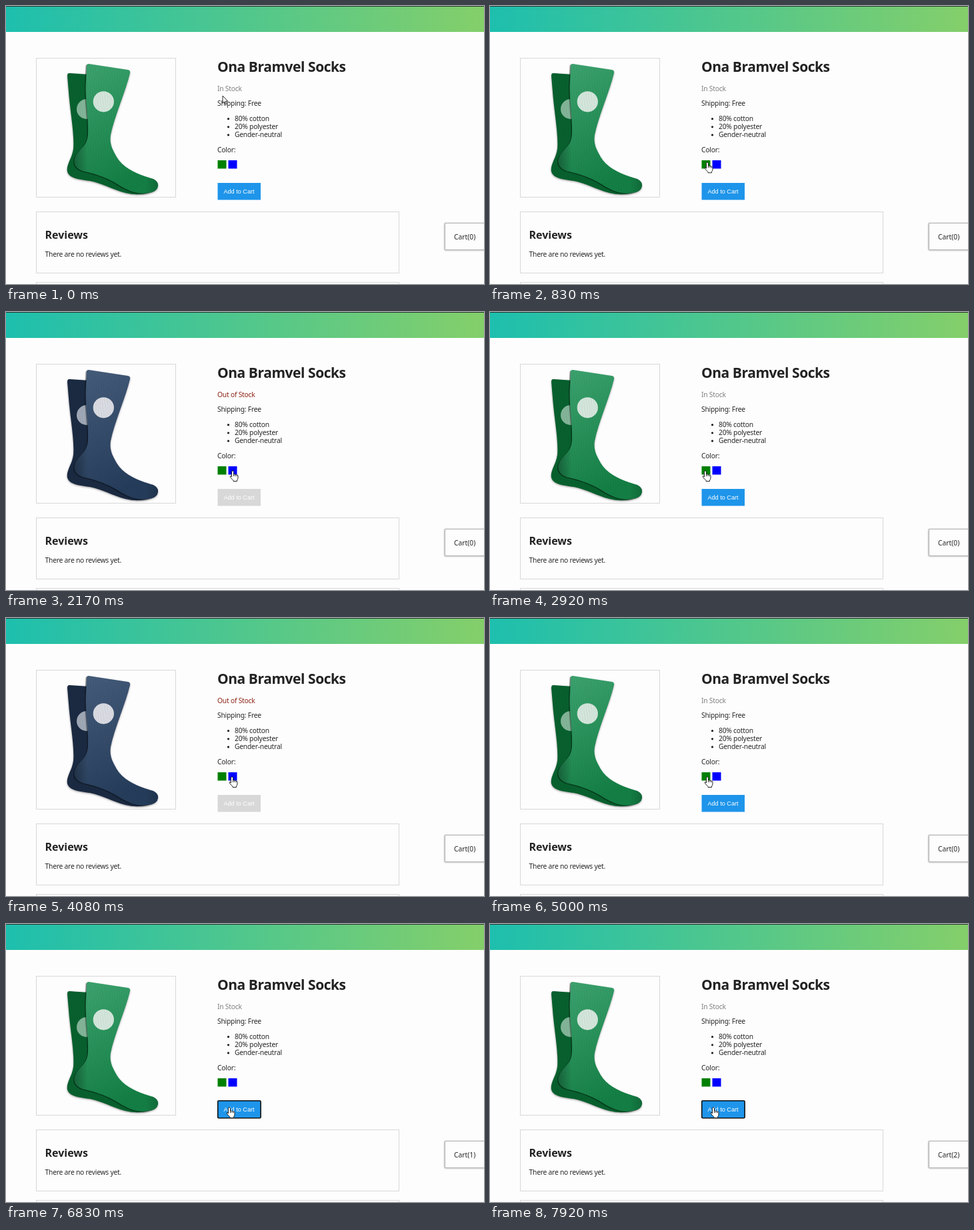
Recreate the animation shown at these times as an HTML page. Size 717x418 px, loop 8000 ms.

```html
<!DOCTYPE html>
<html lang="en">
<head>
<meta charset="utf-8">
<title>Product page</title>
<style>
  html, body { margin: 0; width: 100%; height: 100%; overflow: hidden; background: #fefdfe; }
  svg { display: block; width: 100%; height: 100%; }
  text { font: 10.3px "Noto Sans", "Open Sans", sans-serif; letter-spacing: -.23px; fill: #282828; }
  .title { font-size: 21px; font-weight: 700; letter-spacing: -.45px; fill: #222; }
  .heading { font-size: 16px; font-weight: 700; letter-spacing: 0; fill: #222; }
  .label { font: 9.1px "Liberation Sans", Arial, sans-serif; letter-spacing: 0; fill: #fff; }
  .cart { letter-spacing: 0; }
  .box { fill: none; stroke: #d8d8d8; }
  .cursor { fill: #fff; stroke: #111; stroke-width: .9; stroke-linejoin: round; }
</style>
</head>
<body>
<svg viewBox="0 0 717 418">
  <defs>
    <linearGradient id="nav">
      <stop stop-color="#1dbfae"/><stop offset="1" stop-color="#84cf6a"/>
    </linearGradient>
    <linearGradient id="knit" x1="0" y1="0" x2=".35" y2="1">
      <stop id="knitTop"/><stop id="knitEnd" offset="1"/>
    </linearGradient>
    <linearGradient id="side">
      <stop stop-color="#000" stop-opacity=".3"/>
      <stop offset=".16" stop-color="#000" stop-opacity="0"/>
      <stop offset=".85" stop-color="#000" stop-opacity="0"/>
      <stop offset="1" stop-color="#000" stop-opacity=".16"/>
    </linearGradient>
    <pattern id="ribs" width="2.6" height="4" patternUnits="userSpaceOnUse" patternTransform="rotate(4)">
      <path d="M.5 0V4" stroke="#000" stroke-opacity=".13" stroke-width=".8"/>
    </pattern>
    <path id="front" d="M124 87L183 96Q187 97 186 101C179 130 163 165 157 194C155 208 160 216 166 227C177 246 203 255 221 260Q229 264 228 271Q227 279 214 281C198 284 183 278 169 269C154 259 136 253 119 249C104 246 98 235 106 223C113 213 122 209 123 193C124 165 118 140 120 112L121 90Q121 87 124 87Z"/>
    <path id="back" d="M95 101L125 103 140 225 150 255 215 280Q199 286 179 281C160 276 143 266 126 263C112 261 95 260 92 249C90 239 99 229 101 215C103 194 96 157 94 129L92 105Q92 101 95 101Z"/>
    <clipPath id="backClip"><use href="#back"/></clipPath>
    <filter id="soft" x="-20%" y="-20%" width="140%" height="140%"><feGaussianBlur stdDeviation="1.6"/></filter>
  </defs>

  <rect width="717" height="418" fill="#fefdfe"/>
  <rect width="717" height="39" fill="url(#nav)"/>
  <rect width="717" height="1" fill="#26332f"/>

  <rect class="box" x="45.5" y="78.5" width="209" height="209"/>
  <use href="#back" y="1" fill="#000" opacity=".4" filter="url(#soft)"/>
  <use href="#front" y="1.5" fill="#000" opacity=".3" filter="url(#soft)"/>
  <use id="backFill" href="#back"/>
  <circle id="backBadge" cx="121" cy="155" r="15" clip-path="url(#backClip)"/>
  <use href="#back" fill="url(#ribs)"/>
  <use href="#front" x="-1.5" y="1" fill="#000" opacity=".4"/>
  <use href="#front" fill="url(#knit)"/>
  <use href="#front" fill="url(#side)"/>
  <circle id="badge" cx="146.3" cy="143.8" r="15.6"/>
  <use href="#front" fill="url(#ribs)"/>

  <text class="title" x="317" y="99">Ona Bramvel Socks</text>
  <text id="stock" x="317" y="128"></text>
  <text x="317" y="150.3">Shipping: Free</text>
  <g id="details"></g>
  <text x="317" y="219.5">Color:</text>
  <rect x="317.5" y="232" width="13" height="12.5" fill="#008000"/>
  <rect x="333.5" y="232" width="13" height="12.5" fill="#00f"/>

  <rect id="button" x="317.5" y="266" width="64.5" height="25.5"/>
  <rect id="ring" x="317.7" y="265.7" width="64.4" height="26" rx="1.5" fill="none" stroke="#101010" stroke-width="1.6"/>
  <text class="label" x="326.5" y="281.8">Add to Cart</text>

  <rect class="box" x="45.5" y="309.5" width="544" height="92"/>
  <text class="heading" x="58.5" y="350">Reviews</text>
  <text x="58.5" y="376.6">There are no reviews yet.</text>
  <rect class="box" x="45.5" y="415.5" width="544" height="60"/>

  <rect x="658" y="327" width="80" height="40" fill="#000" opacity=".45" filter="url(#soft)"/>
  <rect x="658.5" y="326.5" width="80" height="40" fill="#fefdfe" stroke="#b4b4b4"/>
  <text class="cart" id="cart" x="672" y="351"></text>

  <path class="cursor" id="arrow" d="M0 0V11.2L2.6 8.8 4.4 12.8 6 12 4.3 8.2H7.8Z"/>
  <path class="cursor" id="hand" d="M-1.5 9V1.3a1.5 1.5 0 0 1 3 0V5.5a1.3 1.3 0 0 1 2.4 .4a1.3 1.3 0 0 1 2.3 .5a1.1 1.1 0 0 1 1.8 .9V10q0 2.5-1.5 4V15.5H1V14.3Q-1 12.5-3.6 9.2Q-4.3 7.6-2.9 7.4Q-2 7.6-1.5 9ZM1.5 5.5V8M3.9 6V8M6.2 6.5V8.2"/>
</svg>
<script>
const LOOP = 8000, STEP = 1000 / 12;
const $ = id => document.getElementById(id);

const GREEN = { top: '#3fa873', end: '#148246', back: '#08632f', badge: '#d9ece1', backBadge: '#86b99c' };
const BLUE = { top: '#48607f', end: '#263e5d', back: '#1b2b43', badge: '#dfe1e8', backBadge: '#a3acba' };

// Cursor stops: time, x, y
const PATH = [
  [0, 325, 135], [170, 325, 138], [920, 326, 239], [1170, 326, 239],
  [1500, 335, 238], [1750, 340, 239], [2500, 340, 239], [2920, 323, 239],
  [3330, 323, 239], [3830, 339, 239], [4330, 339, 239], [4830, 326, 239],
  [5330, 326, 239], [6080, 335, 276], [LOOP, 335, 276]
];

['80% cotton', '20% polyester', 'Gender-neutral'].forEach((line, i) => {
  const y = 173 + i * 12.1;
  $('details').innerHTML += `<circle cx="333.5" cy="${y - 3.3}" r="1.6" fill="#222"/><text x="343" y="${y}">${line}</text>`;
});

const set = (id, attrs) => {
  for (const key in attrs) $(id).setAttribute(key, attrs[key]);
};
const within = (t, from, to) => t >= from && t < to;
const ease = u => u * u * (3 - 2 * u);

function cursorAt(t) {
  const i = PATH.findIndex((p, n) => n && t <= p[0]);
  const [t0, x0, y0] = PATH[i - 1], [t1, x1, y1] = PATH[i];
  const u = ease((t - t0) / (t1 - t0));
  return [x0 + (x1 - x0) * u, y0 + (y1 - y0) * u];
}

function overTarget(x, y) {
  const onSwatch = within(y, 232, 245) && (within(x, 317, 331) || within(x, 333, 347));
  return onSwatch || (within(x, 317, 382) && within(y, 266, 292));
}

function draw(t) {
  const soldOut = within(t, 1490, 2700) || within(t, 3640, 4590);
  const sock = soldOut && t > 1540 ? BLUE : GREEN;
  set('knitTop', { 'stop-color': sock.top });
  set('knitEnd', { 'stop-color': sock.end });
  set('backFill', { fill: sock.back });
  set('badge', { fill: sock.badge });
  set('backBadge', { fill: sock.backBadge });

  $('stock').textContent = soldOut ? 'Out of Stock' : 'In Stock';
  $('stock').style.fill = soldOut ? '#8a2414' : '#808080';
  set('button', { fill: soldOut ? '#d8d8d8' : '#1e95ea' });
  set('ring', { opacity: t >= 6490 ? 1 : 0 });
  $('cart').textContent = `Cart(${(t >= 6570) + (t >= 7490)})`;

  const [x, y] = cursorAt(t);
  const pointing = overTarget(x, y);
  const transform = `translate(${x} ${y})`;
  set('hand', { transform, opacity: pointing ? 1 : 0 });
  set('arrow', { transform, opacity: pointing ? 0 : 1 });
}

const start = performance.now();
function tick() {
  const t = (performance.now() - start) % LOOP;
  draw(Math.floor((t + 4) / STEP) * STEP % LOOP);
  requestAnimationFrame(tick);
}
tick();
</script>
</body>
</html>
```
